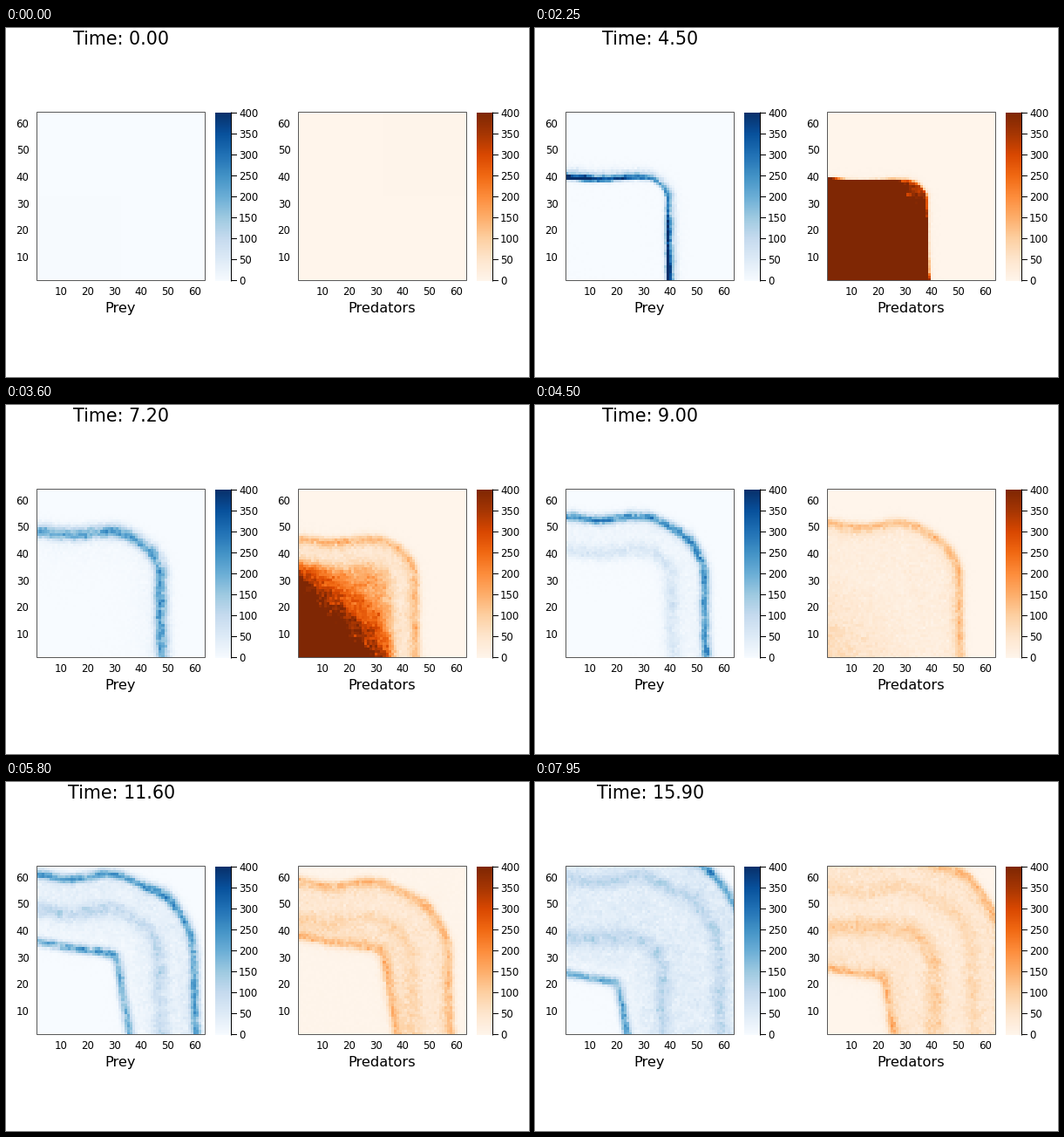
Write a matplotlib script that moves like this. It is 600x400 px and loops after 8000 ms.

```python
import math

import numpy as np
import matplotlib.pyplot as plt
from matplotlib.animation import FuncAnimation
from matplotlib.patches import Rectangle

W, H, DPI = 600, 400, 100
FRAMES, STEP_MS = 160, 50
CELLS, VMAX = 64, 400
LEFT, TOP, SIDE = 35.5, 96.5, 193.0
BOTTOM = TOP + SIDE
UNIT = SIDE / (CELLS - 1)

plt.rcParams["font.family"] = "DejaVu Sans"
rng = np.random.default_rng(7)
x, y = np.meshgrid(np.arange(1, CELLS + 1), np.arange(1, CELLS + 1))


def from_square(size):
    """Signed distance from the square that fills the lower left corner."""
    side = np.maximum(x, y) - size
    outside = np.hypot(np.maximum(x - size, 0), np.maximum(y - size, 0))
    return np.where(side > 0, outside, side)


dist, core = from_square(32), from_square(24)
inner = 1.2 * np.logaddexp((x + 0.15 * y) / 1.2, (y + 0.15 * x) / 1.2)
spread = np.clip(np.abs(x - y) / 38, 0, 1)
# predators sweep the square from its upper right corner
arrival = 3.65 + 0.55 * (np.hypot(32 - x, 32 - y) / 45) ** 0.6
upper = 1 / (1 + np.exp(-(y - x) / 4))
wiggle = (upper * np.cos(2 * np.pi * x / 27)
          + (1 - upper) * (1.1 * np.exp(-y / 8) - 0.25))
corner = np.sin(2 * np.arctan2(np.maximum(y - 32, 0), np.maximum(x - 32, 0)))
erfc = np.vectorize(math.erfc)


def noise(keep, blur):
    """Unit noise fields that drift from frame to frame."""
    out = np.empty((FRAMES, CELLS, CELLS))
    cur = rng.standard_normal((CELLS, CELLS))
    for k in range(FRAMES):
        out[k] = cur
        fresh = rng.standard_normal((CELLS, CELLS))
        cur = keep * cur + math.sqrt(1 - keep * keep) * fresh
    for _ in range(blur):
        for axis in (1, 2):
            out = (out + np.roll(out, 1, axis) + np.roll(out, -1, axis)) / 3
    return out / out.std()


prey_grain, pred_grain = noise(0.8, 0), noise(0.8, 0)
prey_blotch, pred_blotch = noise(0.95, 1), noise(0.95, 1)


def sig(v):
    return 1 / (1 + np.exp(-np.clip(v, -50, 50)))


def ramp(t, a, b):
    u = min(max((t - a) / (b - a), 0), 1)
    return u * u * (3 - 2 * u)


def ridge(z, below, above):
    return np.exp(-0.5 * (z / np.where(z < 0, below, above)) ** 2)


def key(t, times, values):
    return float(np.interp(t, times, values))


MARKS = (4.5, 7.2, 9, 11.6, 13.3, 15.9)


def front(t):
    return key(t, (3.4,) + MARKS, (4.5, 7.6, 15.3, 20.8, 27.9, 32.3, 38.3))


def middle(t):
    return key(t, (7.5, 9, 10, 11.6, 13.3, 15.9),
               (7.5, 8.6, 10.8, 15, 19.8, 26.6))


def hollow(t):
    return key(t, (9, 10.2, 11.6, 13.3, 15.9), (40.5, 39, 35.4, 30.4, 23.5))


def coords(t):
    grow = min(0.085 * t, 1.0)
    return dist - grow * (wiggle - 1.5 * corner), inner - 0.2 * grow * wiggle


def early_prey(t, d):
    if t == 0:
        return (dist <= 0) * 1.0
    grown = 0.5 * math.exp(2.2 * t) * erfc((d - 0.5) / math.sqrt(4.8 * t))
    grown = grown * (1 + ramp(t, 3.4, 4.3) * (0.9 * spread - 0.4))
    edge = key(t, (3.4, 4.5, 5.4), (2, 6.6, 9.2))
    eaten = sig((t - arrival) / 0.03) * sig((edge - d) / 0.3)
    return grown * (1 - eaten)


def late_prey(t, d, rho):
    z = d - front(t)
    hole = rho - hollow(t)
    width = key(t, (5.4, 7.2, 9), (1.2, 1.5, 1.15))
    height = key(t, (5.4, 7.2, 9, 11.6), (260, 200, 225, 200))
    base = key(t, MARKS, (0, 3, 8, 25, 30, 40))
    m = height * ridge(z, width, 1.25 * width)
    m += 24 * np.exp(np.minimum(z, 0) / 4) * sig(-z / 0.5)
    m += base * sig(-z) * sig((rho - min(hollow(t), 37) - 4) / 2)
    m += (key(t, (7.4, 9, 10, 13.3, 15.9), (0, 52, 72, 70, 62))
          * ridge(d - middle(t), 2, 2))
    m += 190 * ramp(t, 9.2, 11.2) * ridge(hole, 1.1, 1.3)
    third = key(t, (14, 15.9), (11.5, 13))
    m += 66 * ramp(t, 14, 15.8) * ridge(core - third, 2.2, 2.2)
    return m


def prey_mean(t):
    d, rho = coords(t)
    mix = ramp(t, 4.4, 5.4)
    m = np.zeros_like(dist, dtype=float)
    if mix < 1:
        m = m + (1 - mix) * early_prey(t, d)
    if mix > 0:
        m = m + mix * late_prey(t, d, rho)
    return m


def pred_mean(t):
    d, rho = coords(t)
    m = math.exp(-1.6 * t) * ((x > 32) & (y > 32))
    if t < 3.45:
        return m
    # bulk left in the square, fading after the burst
    size = 1e5 * math.exp(-1.57 * (t - 4.5))
    slope = key(t, (4.5, 7.2, 9), (0.087, 0.04, 0.027))
    edge = key(t, (3.4, 4.5, 7.2), (2, 6.3, 3.4))
    soft = key(t, (4.5, 7.2, 9), (0.2, 1.4, 3))
    bulk = np.minimum(size * np.exp(-slope * (x + y)), 5000)
    m = m + bulk * sig((edge - d) / soft) * sig((t - arrival) / 0.03)

    z = d - (front(t) - 2.1)
    hole = rho - hollow(t) - 1.8
    base = key(t, MARKS, (20, 28, 15, 28, 33, 35))
    wave = 82 * ridge(z, 1.7, 1.1)
    wave += 48 * np.exp(np.minimum(z, 0) / 4) * sig(-z / 0.5)
    wave += base * sig(-z) * sig(rho - min(hollow(t), 36))
    m = m + ramp(t, 3.7, 4.4) * wave
    m += (key(t, (9, 10, 11.6, 13.3, 15.9), (0, 20, 36, 42, 40))
          * ridge(d - middle(t) + 3.3, 2.2, 2.2))
    reach = key(t, (11.6, 13.3), (8, 4))
    rim = 65 * ridge(hole, 1.0, 1.6)
    rim += 45 * np.exp(-np.maximum(hole, 0) / reach) * sig(hole / 0.5 + 1)
    m += ramp(t, 9.6, 11.4) * rim
    third = key(t, (14, 15.9), (15, 17))
    m += 62 * ramp(t, 14, 15.9) * ridge(core - third, 2.6, 2.6)
    return m


def sample(mean, t, blotch, grain, rough):
    gain = min(t, 1)
    rough = rough + 0.15 * (1 - ramp(t, 3, 4.5))
    value = (mean * np.exp(gain * rough * blotch)
             + 1.2 * gain * np.sqrt(mean) * grain)
    return np.clip(value, 0, VMAX)


fig = plt.figure(figsize=(W / DPI, H / DPI), dpi=DPI, facecolor="white")
ax = fig.add_axes([0, 0, 1, 1])
ax.set_xlim(0, W)
ax.set_ylim(H, 0)
ax.axis("off")
ax.autoscale(False)


def label(px, py, text, size, ha="center"):
    return ax.text(px, py, text, fontsize=size * 72 / DPI, ha=ha,
                   va="baseline", color="black")


def panel(shift, name, cmap):
    cmap = plt.get_cmap(cmap, 1024)
    left = LEFT + shift
    half = UNIT / 2
    image = ax.imshow(np.zeros((CELLS, CELLS)), cmap=cmap, vmin=0, vmax=VMAX,
                      origin="lower", interpolation="nearest", aspect="auto",
                      extent=(left - half, left + SIDE + half,
                              BOTTOM + half, TOP - half))
    image.set_clip_path(Rectangle((left, TOP), SIDE, SIDE,
                                  transform=ax.transData))
    ax.add_patch(Rectangle((left, TOP), SIDE, SIDE, fill=False, snap=False,
                           edgecolor="#5a5a5a", linewidth=0.72))
    for v in range(10, 61, 10):
        off = (v - 1) * UNIT
        label(left + off, 306, str(v), 11.7)
        label(left - 9, BOTTOM - off + 5, str(v), 11.7, "right")
    label(left + SIDE / 2 - 1, 326.3, name, 16.2)

    bar, bar_top, bar_low = left + 204.5, 97, 290
    ax.imshow(np.linspace(0, 1, 256)[:, None], cmap=cmap, vmin=0, vmax=1,
              origin="lower", aspect="auto", interpolation="nearest",
              extent=(bar, bar + 18, bar_low, bar_top))
    edge = bar + 18.5
    ax.plot([edge, edge], [bar_low, bar_top], color="black", lw=0.72,
            snap=False)
    for v in range(0, VMAX + 1, 50):
        ty = bar_low - 0.5 - v / VMAX * (bar_low - bar_top - 1)
        ax.plot([edge, edge + 6], [ty, ty], color="black", lw=0.72,
                snap=False)
        label(bar + 27, ty + 4.5, str(v), 11.7, "left")
    return image


prey_image = panel(0, "Prey", "Blues")
pred_image = panel(300, "Predators", "Oranges")
title = label(132.3, 19, "", 20.6)


def draw(k):
    t = k / 10
    title.set_text(f"Time: {t:.2f}")
    prey_image.set_data(sample(prey_mean(t), t, prey_blotch[k],
                               prey_grain[k], 0.13))
    pred_image.set_data(sample(pred_mean(t), t, pred_blotch[k],
                               pred_grain[k], 0.08))
    return prey_image, pred_image, title


anim = FuncAnimation(fig, draw, frames=FRAMES, interval=STEP_MS,
                     repeat=True, repeat_delay=0, blit=False)
plt.show()
```
